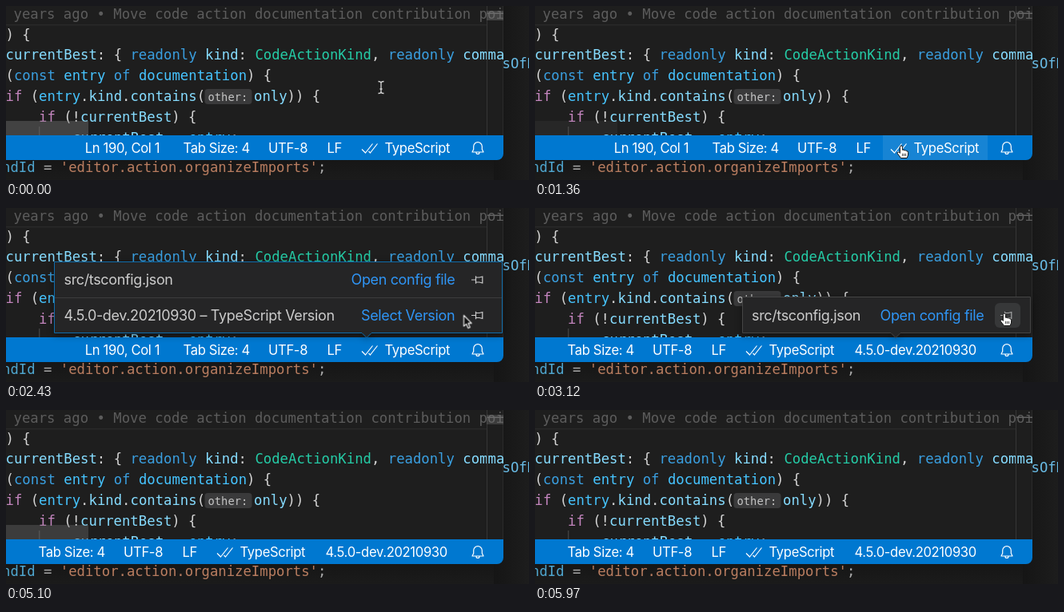
Write an HTML page that moves like this. It is 654 px wide and 218 px high and loops after 6670 ms.

```html
<!DOCTYPE html>
<html lang="en">
<head>
<meta charset="utf-8">
<title>Pinning a language status item</title>
<style>
html, body { margin: 0; width: 100%; height: 100%; overflow: hidden; background: #1c1c1c; }
svg { display: block; width: 654px; height: 218px; }
text { white-space: pre; fill: #d4d4d4; }
.code { font: 17.27px "DejaVu Sans Mono", monospace; }
.code .hint { font-size: 13.8px; fill: #c4c4c4; }
.bar text, .popup text { font-family: Inter, "Liberation Sans", sans-serif; letter-spacing: -.02em; }
.bar text { font-size: 16.6px; fill: #fff; }
.popup text { font-size: 18px; fill: #ccc; }
.popup .link { fill: #2f95f5; }
.popup { filter: drop-shadow(0 2px 5px rgba(0, 0, 0, .4)); }
.line { fill: none; stroke: #fff; stroke-width: 1.2; stroke-linejoin: round; }
.pin { fill: none; stroke: #ccc; stroke-width: 1.2; }
.v { fill: #86dcff; }
.k { fill: #3a9fe0; }
.n { fill: #46c4ff; }
.t { fill: #25cba6; }
.c { fill: #c586c0; }

.anim { animation: 6670ms step-end infinite; }
.bars { animation-name: bars; }
.hover { animation-name: hover; }
.list { animation-name: list; }
.single { animation-name: single; }
.button { animation-name: button; }
.items { animation-name: items; }
.position { animation-name: position; }
.version { animation-name: version; }
.mouse { animation-name: mouse; }
.beam { animation-name: beam; }
.hand { animation-name: hand; }
.arrow { animation-name: arrow; }

@keyframes bars {
  0% { opacity: 1; }
  10.34% { opacity: 1; animation-timing-function: steps(8); }
  22% { opacity: 0; }
  61.61% { opacity: 1; }
  76.45% { opacity: .87; animation-timing-function: steps(7); }
  86.65% { opacity: 0; }
  100% { opacity: 0; }
}
@keyframes hover { 0%, 100% { opacity: 0; } 16.04% { opacity: 1; } 30.65% { opacity: 0; } }
@keyframes list { 0%, 100% { opacity: 0; } 23.38% { opacity: .5; } 24.88% { opacity: 1; } 43.77% { opacity: 0; } }
@keyframes single { 0%, 100% { opacity: 0; } 43.77% { opacity: 1; } 63.11% { opacity: 0; } }
@keyframes button { 0%, 100% { opacity: 0; } 37.78% { opacity: 1; } 60.11% { opacity: 0; } }
@keyframes items { 0% { transform: none; } 43.77%, 100% { transform: translateX(-181px); } }
@keyframes position { 0% { opacity: 1; } 43.77%, 100% { opacity: 0; } }
@keyframes version { 0% { opacity: 0; } 43.77%, 100% { opacity: 1; } }
@keyframes beam { 0% { opacity: 1; } 16.04% { opacity: 0; } 60.11% { opacity: 1; } 64.61%, 100% { opacity: 0; } }
@keyframes hand { 0%, 100% { opacity: 0; } 16.04% { opacity: 1; } 30.65% { opacity: 0; } 39.28% { opacity: 1; } 60.11% { opacity: 0; } }
@keyframes arrow { 0%, 100% { opacity: 0; } 30.65% { opacity: 1; } 39.28% { opacity: 0; } }
@keyframes mouse {
  0% { transform: translate(469px, 102px); }
  10.34% { transform: translate(469px, 105px); }
  11.76% { transform: translate(468px, 116px); }
  13.19% { transform: translate(466px, 134px); }
  14.61% { transform: translate(462px, 152px); }
  16.04% { transform: translate(460px, 167px); }
  17.46% { transform: translate(458px, 173px); }
  18.89% { transform: translate(458px, 175px); }
  29.23% { transform: translate(461px, 172px); }
  30.65% { transform: translate(472px, 162px); }
  32.08% { transform: translate(494px, 150px); }
  33.5% { transform: translate(524px, 141px); }
  34.93% { transform: translate(553px, 136px); }
  36.43% { transform: translate(572.5px, 134.5px); }
  37.78% { transform: translate(577px, 133px); }
  39.28% { transform: translate(587px, 132px); }
  60.11% { transform: translate(576.5px, 105px); }
  61.61% { transform: translate(570px, 58px); }
  63.11% { transform: translate(564px, 16px); }
  64.61%, 100% { transform: translate(560px, -30px); }
}
</style>
</head>
<body>
<svg viewBox="0 0 654 218">
  <defs>
    <clipPath id="win"><path d="M0 0H622V185A8 8 0 0 1 614 193H0Z"/></clipPath>
    <clipPath id="pane"><rect width="622" height="162"/></clipPath>
    <linearGradient id="side"><stop stop-color="#151515"/><stop offset="1" stop-color="#1d1d1d"/></linearGradient>
    <linearGradient id="below" x2="0" y2="1"><stop stop-color="#151515"/><stop offset="1" stop-color="#1b1b1b"/></linearGradient>
    <path id="pin" class="pin" d="M-8 0H-2.5M-2.5 -4.8V4.8M-2.5 -3H2L5.8 -4V4L2 3H-2.5"/>
  </defs>

  <!-- editor behind -->
  <rect y="186" width="654" height="32" fill="url(#below)"/>
  <rect x="610" width="44" height="218" fill="url(#side)"/>
  <g class="code">
    <text x="620.5" y="78" style="fill:#69bce6">sOfK</text>
    <text x="-5" y="208" style="fill:#a9a9a9"><tspan fill="#4fa6cf">ndId</tspan> = <tspan fill="#b97d60">'editor.action.organizeImports'</tspan>;</text>
  </g>

  <!-- front window -->
  <g clip-path="url(#win)">
    <rect width="622" height="194" fill="#1e1e1e"/>
    <g class="code" clip-path="url(#pane)">
      <rect y="23" width="601" height="1.5" fill="#292929"/>
      <text x="9.5" y="16" style="fill:#5c5c5c">years ago • Move code action documentation contribution poi</text>
      <text x="-.5" y="41.5">) {</text>
      <text x="-.5" y="67"><tspan class="v">currentBest</tspan>: { <tspan class="k">readonly</tspan> <tspan class="v">kind</tspan>: <tspan class="t">CodeActionKind</tspan>, <tspan class="k">readonly</tspan> <tspan class="v">comma</tspan></text>
      <text x="-.5" y="93">(<tspan class="k">const</tspan> <tspan class="n">entry</tspan> <tspan class="k">of</tspan> <tspan class="n">documentation</tspan>) {</text>
      <text x="-.5" y="119"><tspan class="c">if</tspan> (<tspan class="n">entry</tspan>.<tspan class="v">kind</tspan>.<tspan class="v">contains</tspan>(</text>
      <rect x="248.5" y="104" width="59" height="19" rx="4" fill="#3a3a3b"/>
      <text class="hint" x="252.5" y="118.5">other:</text>
      <text x="310" y="119"><tspan class="v">only</tspan>)) {</text>
      <text x="41" y="145"><tspan class="c">if</tspan> (!<tspan class="v">currentBest</tspan>) {</text>
      <rect x="41" y="151" width="1.4" height="12" fill="#404040"/>
      <text x="83" y="171"><tspan class="v">currentBest</tspan> = <tspan class="n">entry</tspan>;</text>
      <rect x="601" width="1" height="163" fill="#363636"/>
      <rect x="602" y="8.5" width="20" height="1.5" fill="#626262"/>
      <g class="anim bars" fill="rgba(121,121,121,.4)">
        <rect y="144" width="103" height="19"/>
        <rect x="601" y="6" width="21" height="12"/>
      </g>
    </g>

    <g class="bar">
      <rect y="162" width="622" height="32" fill="#0078d0"/>
      <rect class="anim hover" x="435" y="162" width="131" height="32" fill="#fff" fill-opacity=".09"/>
      <text class="anim position" x="98.7" y="184">Ln 190, Col 1</text>
      <g class="anim items">
        <text x="221.5" y="184">Tab Size: 4</text>
        <text x="328" y="184">UTF-8</text>
        <text x="401.5" y="184">LF</text>
        <path class="line" d="M445 179.5L449.5 184L458.5 172.5M453.5 182L455.5 184L464.5 172.5"/>
        <text x="473.5" y="184">TypeScript</text>
      </g>
      <text class="anim version" x="399.5" y="184">4.5.0-dev.20210930</text>
      <path class="line" d="M583 183H597L595.3 179.5V176A5.3 5.3 0 0 0 584.7 176V179.5ZM588 183.5A2 2 0 0 0 592 183.5"/>
    </g>
  </g>
  <path d="M621.5 0V162" stroke="#fff" stroke-opacity=".06"/>

  <g class="anim list">
    <g class="popup">
      <path d="M60.5 67.5H620.5V156.5H457L451 162.5L445 156.5H60.5Z" fill="#252526" stroke="#0f6cab"/>
      <rect x="61" y="112" width="559" height="1" fill="#3c3c3d"/>
      <text x="72.5" y="96">src/tsconfig.json</text>
      <text class="link" x="431.5" y="96">Open config file</text>
      <text x="72.5" y="141">4.5.0-dev.20210930 – TypeScript Version</text>
      <text class="link" x="444" y="141">Select Version</text>
      <use href="#pin" x="590" y="90"/>
      <use href="#pin" x="590" y="134.5"/>
    </g>
  </g>
  <g class="anim single">
    <g class="popup">
      <path d="M259.5 111.5H619.5V156.5H457L451 162.5L445 156.5H259.5Z" fill="#252526" stroke="#454545"/>
      <text x="271" y="141">src/tsconfig.json</text>
      <text class="link" x="431.5" y="141">Open config file</text>
      <use href="#pin" x="590" y="134.5"/>
    </g>
  </g>
  <rect class="anim button" x="575" y="119" width="32" height="31" rx="6" fill="#5a5d5e" fill-opacity=".35"/>

  <g class="anim mouse">
    <path class="anim beam" d="M-3.5 -7.5Q0 -7.5 0 -5.5Q0 -7.5 3.5 -7.5M0 -5.5V5.5M-3.5 7.5Q0 7.5 0 5.5Q0 7.5 3.5 7.5M-1.5 2H1.5" fill="none" stroke="#d8d8d8" stroke-width="1.3"/>
    <g class="anim hand" stroke="#111" stroke-width="1" stroke-linejoin="round">
      <path d="M-1.6 1.6Q-1.6 0 0 0Q1.6 0 1.6 1.6V5.4Q3.2 4.4 4.2 6Q5.8 5.2 6.6 6.8Q8.6 6.4 8.6 8.4V11Q8.4 13 7 15.5H-.5Q-2.5 12.5 -4.8 9.8Q-5.4 8.2 -3.8 8Q-2.4 8.2 -1.6 9.4Z" fill="#fff"/>
      <path d="M1.6 9.8V13M3.6 9.8V13M5.6 9.8V13" fill="none" stroke-width=".8"/>
    </g>
    <path class="anim arrow" d="M0 0V13.6L3.1 10.8L5.4 16L7.8 15L5.5 9.9H9.7Z" fill="#111" stroke="#fff" stroke-width="1.1" stroke-linejoin="round"/>
  </g>
</svg>
</body>
</html>
```
